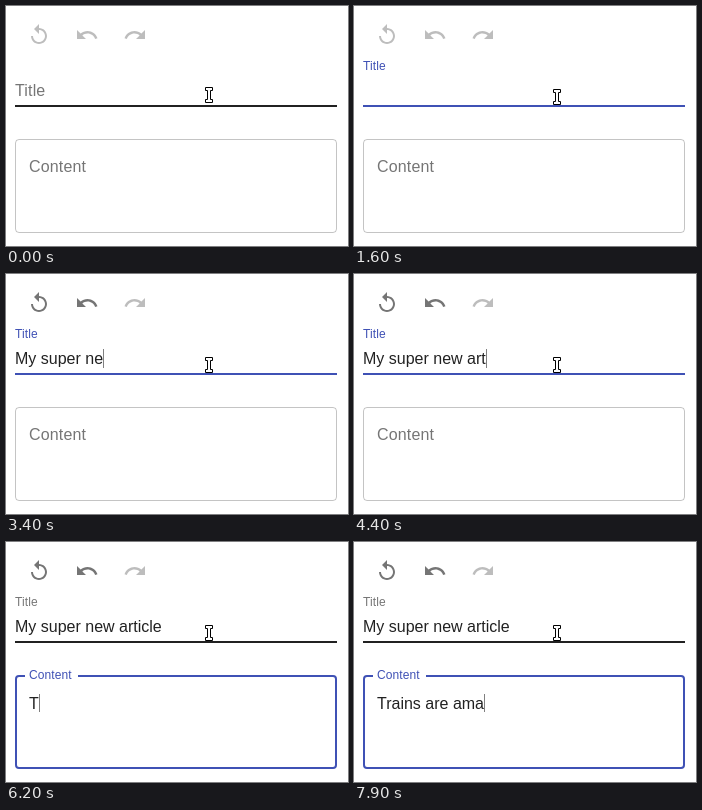
An HTML page that plays this animation: 342 px wide and 240 px high, repeating every 8000 ms.

```html
<!DOCTYPE html>
<html lang="en">
<head>
<meta charset="utf-8">
<title>Form with undo</title>
<style>
  html, body { margin: 0; width: 100%; height: 100%; overflow: hidden; background: #fff; }
  body { position: relative; font: 16px "Liberation Sans", Arial, sans-serif; }
  body > * { position: absolute; box-sizing: border-box; }
  svg { left: 0; top: 0; }
  .label { line-height: 1; letter-spacing: 0.00938em; transform-origin: 0 0; white-space: pre; }
  .field { line-height: 19px; height: 19px; white-space: pre; color: rgba(0, 0, 0, .87); }
  .caret { position: absolute; top: 0; width: 1px; }
  .line { left: 9px; top: 99px; width: 322px; height: 2px; background: rgba(0, 0, 0, .87); }
  #focusLine { background: #3f51b5; }
  #box { left: 9px; top: 133px; width: 322px; height: 94px; border-radius: 4px; }
  #notch { left: 19px; top: 133px; height: 2px; background: #fff; }
</style>
</head>
<body>
<svg id="icons" width="342" height="60">
  <path id="reset" transform="translate(21 17)" d="M12 5V1L7 6l5 5V7c3.31 0 6 2.69 6 6s-2.69 6-6 6-6-2.69-6-6H4c0 4.42 3.58 8 8 8s8-3.58 8-8-3.58-8-8-8z"/>
  <path id="undo" transform="translate(69 17)" d="M12.5 8c-2.65 0-5.05.99-6.9 2.6L2 7v9h9l-3.62-3.62c1.39-1.16 3.16-1.88 5.12-1.88 3.54 0 6.55 2.31 7.6 5.5l2.37-.78C21.08 11.03 17.15 8 12.5 8z"/>
  <path fill="#000" fill-opacity=".26" transform="translate(117 17)" d="M18.4 10.6C16.55 8.99 14.15 8 11.5 8c-4.65 0-8.58 3.03-9.96 7.22L3.9 16c1.05-3.19 4.05-5.5 7.6-5.5 1.95 0 3.73.72 5.12 1.88L13 16h9V7l-3.6 3.6z"/>
</svg>
<div class="line"></div>
<div class="line" id="focusLine"></div>
<div class="label" id="titleLabel" style="left:9px;top:53px">Title</div>
<div class="field" style="left:9px;top:75px"><span id="title"></span><i class="caret" id="titleCaret" style="height:19px"></i></div>
<div id="box"></div>
<div id="notch"></div>
<div class="label" id="contentLabel" style="left:9px;top:133px">Content</div>
<div class="field" style="left:23px;top:152px"><span id="content"></span><i class="caret" id="contentCaret" style="height:18px"></i></div>
<svg width="342" height="240">
  <path id="pointer" d="M199.5 81.5h7v3h-2v9h2v3h-7v-3h2v-9h-2z" fill="#fff" stroke="#000"/>
</svg>
<script>
const LOOP = 8000, STEP = 100, FADE = 200;
const TITLE_FOCUS = 950, CONTENT_FOCUS = 5650;
const GREY = [0, 0, 0, .54], BLUE = [63, 81, 181, 1];
const TITLE = "My super new article", CONTENT = "Trains are amazing";

// [time, number of characters typed]
const titleKeys = [[2100, 1], [2200, 2], [2300, 3], [2500, 4], [2600, 6], [2700, 8], [2800, 9],
  [3400, 11], [3500, 12], [3700, 13], [4100, 14], [4200, 15], [4400, 16], [4500, 17], [4600, 18],
  [4800, 19], [4900, 20]];
const contentKeys = [[6200, 1], [6500, 2], [6600, 3], [6700, 4], [6800, 5], [6900, 6],
  [7100, 8], [7200, 9], [7300, 10], [7400, 11], [7500, 12], [7800, 13], [7900, 14]];

const $ = id => document.getElementById(id);
const clamp = v => Math.max(0, Math.min(1, v));
const lerp = (a, b, p) => a + (b - a) * p;
const within = (t, a, b) => t >= a && t < b;

// cubic-bezier(0, 0, .2, 1)
function easeOut(x) {
  if (x <= 0 || x >= 1) return clamp(x);
  let lo = 0, hi = 1, s = .5;
  for (let i = 0; i < 24; i++) {
    s = (lo + hi) / 2;
    if (.6 * (1 - s) * s * s + s * s * s < x) lo = s; else hi = s;
  }
  return 3 * (1 - s) * s * s + s * s * s;
}

const progress = (t, start) => easeOut((t - start) / FADE);

function typed(text, keys, t) {
  let n = 0;
  for (const [at, count] of keys) if (t >= at) n = count;
  return text.slice(0, n);
}

function tint(p) {
  return `rgba(${GREY.map((v, i) => lerp(v, BLUE[i], p)).join(",")})`;
}

function setLabel(el, x, y0, y1, shrink, focus) {
  el.style.transform = `translate(${x}px,${lerp(y0, y1, shrink)}px) scale(${lerp(1, .75, shrink)})`;
  el.style.color = tint(focus);
}

function setCaret(el, on, color) {
  el.style.visibility = on ? "visible" : "hidden";
  el.style.background = color;
}

function render(t) {
  const titleIn = progress(t, TITLE_FOCUS);
  const contentIn = progress(t, CONTENT_FOCUS);
  const inContent = t >= CONTENT_FOCUS;
  const titleFocus = titleIn - contentIn;

  setLabel($("titleLabel"), 0, 24, 1.5, titleIn, titleFocus);
  setLabel($("contentLabel"), 14, 20, -6, contentIn, contentIn);
  $("focusLine").style.transform = `scaleX(${titleFocus})`;

  $("box").style.border = inContent ? "2px solid #3f51b5" : "1px solid rgba(0,0,0,.23)";
  $("notch").style.width = 52.75 * easeOut((t - CONTENT_FOCUS - 50) / 100) + "px";

  $("title").textContent = typed(TITLE, titleKeys, t);
  $("content").textContent = typed(CONTENT, contentKeys, t);
  setCaret($("titleCaret"), within(t, 1000, 1600) || within(t, 2100, 5500), "#808080");
  setCaret($("contentCaret"), inContent, within(t, 7200, 7300) ? "#111" : "#808080");

  for (const id of ["reset", "undo"]) {
    $(id).setAttribute("fill-opacity", t >= 2100 ? .54 : .26);
  }
  const drop = t < 600 ? 0 : t < 700 ? 1 : 2;
  $("pointer").setAttribute("transform", `translate(0 ${drop})`);
}

const begin = performance.now();
function tick() {
  const t = (performance.now() - begin) % LOOP;
  render(Math.floor(t / STEP) * STEP);
  requestAnimationFrame(tick);
}
render(0);
requestAnimationFrame(tick);
</script>
</body>
</html>
```
